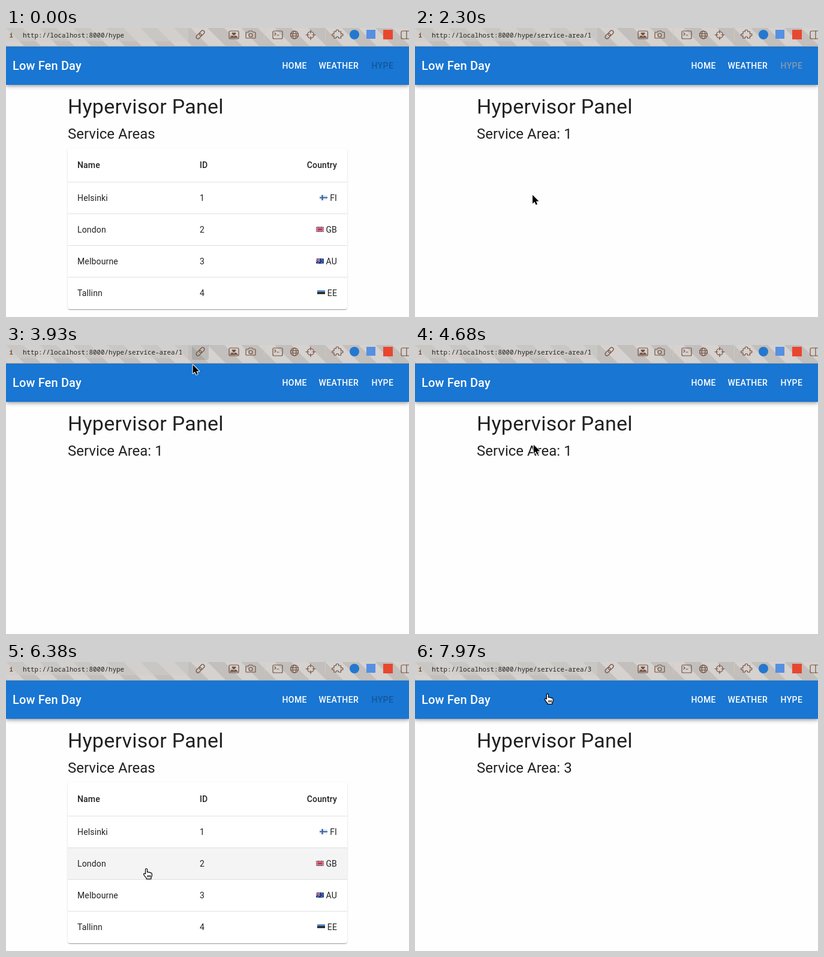
Recreate the animation shown at these times as an HTML page. Size 672 by 483 pixels, loop 8000 ms.

```html
<!DOCTYPE html>
<html lang="en">
<head>
<meta charset="utf-8">
<title>Hypervisor Panel</title>
<style>
  html, body { margin: 0; width: 100%; height: 100%; overflow: hidden; background: #fefefe; }
  div, svg { position: absolute; }
  svg { left: 0; top: 0; }
  #paper {
    left: 103px; top: 201px; width: 466px; height: 269px; border-radius: 4px; background: #fff;
    box-shadow: 0 2px 1px -1px #0003, 0 1px 1px #00000024, 0 1px 3px #0000001f;
  }
  #bar {
    left: 0; top: 31px; width: 672px; height: 64px; background: #1976d2;
    box-shadow: 0 2px 4px -1px #0003, 0 4px 5px #00000024, 0 1px 10px #0000001f;
  }
  text { font: 14px Roboto, sans-serif; fill: #212121; letter-spacing: .01071em; }
  .head text, .nav text { font-weight: 500; }
  .nav text { fill: #fff; letter-spacing: .02857em; }
  .nav .brand { font-size: 20px; letter-spacing: .0075em; }
  .h4 { font-size: 34px; letter-spacing: .00735em; }
  .h5 { font-size: 24px; letter-spacing: 0; }
  .url { font: 500 10.83px "Noto Sans Mono", monospace; letter-spacing: 0; fill: #222; }
  .end { text-anchor: end; }
  .icons { fill: none; stroke: #75503f; stroke-width: 1.2; stroke-linejoin: round; stroke-linecap: round; }
</style>
</head>
<body>
<div id="paper"></div>
<div id="bar"></div>
<svg width="672" height="483" viewBox="0 0 672 483">
  <defs>
    <pattern id="stripes" width="56" height="56" patternUnits="userSpaceOnUse">
      <path fill="#d5d2cf" d="M0 0h56v56H0z"/>
      <path fill="#c2bfbc" d="M0 0H28L56 28V56zM0 28V56H28z"/>
    </pattern>
  </defs>

  <text class="h4" x="103" y="143">Hypervisor Panel</text>
  <text class="h5" id="sub" x="103" y="185"></text>
  <g id="list">
    <rect id="hover" x="103" width="466" height="52"/>
    <g class="head">
      <text x="119" y="234">Name</text>
      <text x="323" y="234">ID</text>
      <text class="end" x="552" y="234">Country</text>
    </g>
    <g id="rows"></g>
  </g>

  <g class="nav">
    <text class="brand" x="11" y="70">Low Fen Day</text>
    <text x="460.5" y="68">HOME</text>
    <text x="521.5" y="68">WEATHER</text>
    <text id="hype" x="609.5" y="68">HYPE</text>
  </g>

  <path fill="url(#stripes)" d="M0 0h672v31H0z"/>
  <path fill="#d0cecb" d="M0 0h304v22H0z" opacity=".55"/>
  <path fill="#b3aeaa" d="M0 30h672v1H0z"/>
  <path fill="#d8c7b8" d="M430 2h1v18h-1zM532 2h1v18h-1z"/>
  <rect id="button" x="310" y="-4" width="28" height="29" rx="3" fill="#0000001c"/>
  <text class="url" x="5.5" y="16" style="fill:#75503f;font-weight:700">i</text>
  <text class="url" id="url" x="28" y="15.5"></text>
  <g class="icons">
    <g transform="rotate(-45 324 11)">
      <rect x="315.5" y="8" width="10" height="6" rx="3"/>
      <rect x="322.5" y="8" width="10" height="6" rx="3"/>
    </g>
    <rect x="372" y="5" width="16" height="13" rx="2"/>
    <path fill="#75503f" d="M380 12l-3-3q1.500-2 3 0 1.500-2 3 0zM374 16l3-3 3 2 3-2 3 3z"/>
    <path d="M401 7h3l1.500-2h5l1.500 2h3q1 0 1 1v8q0 1-1 1h-14q-1 0-1-1V8q0-1 1-1z"/>
    <circle cx="408" cy="12" r="3"/>
    <rect x="445" y="5" width="16" height="13" rx="2"/>
    <path d="M448 8l2 2-2 2M452 12h3"/>
    <circle cx="481" cy="11.500" r="6.500"/>
    <ellipse cx="481" cy="11.500" rx="3" ry="6.500"/>
    <path d="M475 9.500h12M475 13.500h12"/>
    <circle cx="508" cy="11.500" r="5.500"/>
    <path d="M508 3.500v5M508 14.500v5M500 11.500h5M511 11.500h5"/>
    <path d="M547 6h3.500q-1-3 2-3t2 3h4v4q3.500-1 3.500 1.500t-3.500 1.500v4h-4q.5-2.500-2-2.500t-2 2.500H547v-4q-3.500.5-3.500-1.500t3.500-1.500z"/>
    <rect x="659" y="5" width="18" height="13" rx="2"/>
    <path d="M668 5v13"/>
  </g>
  <circle cx="581" cy="11" r="8" fill="#2478cf"/>
  <rect x="601" y="3" width="15" height="15" fill="#5590e2"/>
  <rect x="629" y="3" width="16" height="16" fill="#e8472f"/>

  <g id="cursor" stroke-linejoin="round">
    <path id="arrow" stroke="#fff" stroke-width="2" paint-order="stroke"
      d="M0 0V14.500L3.400 11.400 5.600 16.600 8 15.600 5.900 10.600H10.500Z"/>
    <g id="hand" stroke="#000" stroke-width="1.200">
      <path fill="#fff" d="M-1.600 9V1.600A1.500 1.500 0 0 1 1.400 1.600V6.200Q2.600 5.200 4.100 6.600 5.600 5.800 6.800 7.400 9 6.900 9.200 9V11.500Q9 13.500 7.800 15.200V17.400H0V16Q-2.300 13.800-4.400 10.400-5 8.600-3.400 8.200-2.400 8.200-1.600 9Z"/>
      <path d="M2 11v3.500M4.200 11v3.500M6.400 11v3.500"/>
    </g>
  </g>
</svg>
<script>
  const $ = id => document.getElementById(id);
  const show = (id, on) => $(id).style.display = on ? '' : 'none';
  const ramp = (t, a, b) => Math.min(1, Math.max(0, (t - a) / (b - a)));
  const within = (t, a, b) => t >= a && t < b;

  const stroke = (color, width, d) => `<path d="${d}" stroke="${color}" stroke-width="${width}"/>`;
  const field = color => `<path fill="${color}" d="M0 .5L6 0 13 .5V8.500L6 9 0 8.500z"/>`;
  const flags = {
    FI: field('#e8edf4') + stroke('#34609f', 2.2, 'M0 4.500H13M4.500 0V9'),
    GB: field('#29437f') + stroke('#eee', 2.4, 'M0 1L13 8M13 1L0 8M0 4.500H13M6.500 0V9') +
        stroke('#cb2a3d', 1.3, 'M0 1L13 8M13 1L0 8M0 4.500H13M6.500 0V9'),
    AU: field('#24408a') + stroke('#eee', 1.4, 'M0 1L6 5M6 1L0 5') +
        stroke('#cb2a3d', 1, 'M0 3H6M3 .5V5') + stroke('#fff', 1.2, 'M3 7h1M9 2h1M10.500 4h1M9 7h1'),
    EE: field('#f0f0f0') + stroke('#3f83c8', 3, 'M0 2H13') + stroke('#111', 3, 'M0 5H13')
  };
  const areas = [['Helsinki', 'FI', 523], ['London', 'GB', 517], ['Melbourne', 'AU', 517], ['Tallinn', 'EE', 519]];
  $('rows').innerHTML = '<path fill="#e0e0e0" d="M103 257h466v1H103z"/>' + areas.map(([name, code, x], i) => {
    const y = 289 + 53 * i;
    return `<text x="119" y="${y}">${name}</text><text x="323" y="${y}">${i + 1}</text>
      <text class="end" x="552" y="${y}">${code}</text>
      <g transform="translate(${x} ${y - 10})">${flags[code]}</g>
      ${i < 3 ? `<path fill="#e0e0e0" d="M103 ${y + 21}h466v1H103z"/>` : ''}`;
  }).join('');

  // Pointer hot spot: time, x, y
  const path = [
    [400, 252, 490], [560, 232, 366], [680, 205, 298], [760, 196, 279],
    [2560, 196, 279], [2700, 191, 240], [2880, 201, 122], [3060, 221, 44], [3350, 267, 6],
    [3400, 268, 6], [3640, 322, 6], [3800, 322, 10], [3930, 312, 32], [4040, 268, 150], [4160, 224, 262],
    [4220, 223, 258], [4390, 203, 209], [4560, 203, 209], [4700, 197, 160], [4850, 196, 135],
    [5830, 196, 135], [6080, 206, 235], [6320, 228, 335], [6380, 234, 345], [6670, 269.500, 386],
    [7560, 269.500, 386], [7750, 250, 230], [7950, 221, 53], [8000, 221, 53]
  ];
  function pointer(t) {
    const i = Math.max(1, path.findIndex(p => p[0] > t));
    const [t0, x0, y0] = path[i - 1], [t1, x1, y1] = path[i];
    const k = ramp(t, t0, t1);
    return [x0 + (x1 - x0) * k, y0 + (y1 - y0) * k];
  }

  function draw(t) {
    const area = within(t, 2190, 5570) ? 1 : t >= 6970 ? 3 : 0;
    const linked = within(t, 2250, 5630) ? 1 : t >= 7030 ? 3 : 0;
    $('sub').textContent = area ? 'Service Area: ' + area : 'Service Areas';
    $('url').textContent = 'http://localhost:8000/hype' + (linked ? '/service-area/' + linked : '');
    show('list', !area);
    show('paper', !area);

    const lit = ramp(t, 2190, 2360) - ramp(t, 5620, 5870) + ramp(t, 6970, 7140);
    $('hype').style.fill = `rgba(${[255, 255, 255].map(c => c * lit)},${.26 + .74 * lit})`;

    const [x, y] = pointer(t);
    const row = Math.floor((y - 258) / 53);
    $('hover').setAttribute('y', 258 + 53 * row);
    $('hover').setAttribute('opacity', row >= 0 && row < 4 ? .045 * ramp(t, 1120, 1300) : 0);
    $('button').setAttribute('opacity', x > 309 ? 1 - ramp(t, 3935, 4020) : 0);

    const hand = within(t, 1120, 2250) || within(t, 4800, 7030) || t >= 7930;
    show('hand', hand);
    show('arrow', !hand);
    $('cursor').setAttribute('transform', `translate(${x} ${y})`);
  }

  function tick() {
    draw(performance.now() % 8000);
    requestAnimationFrame(tick);
  }
  tick();
</script>
</body>
</html>
```
